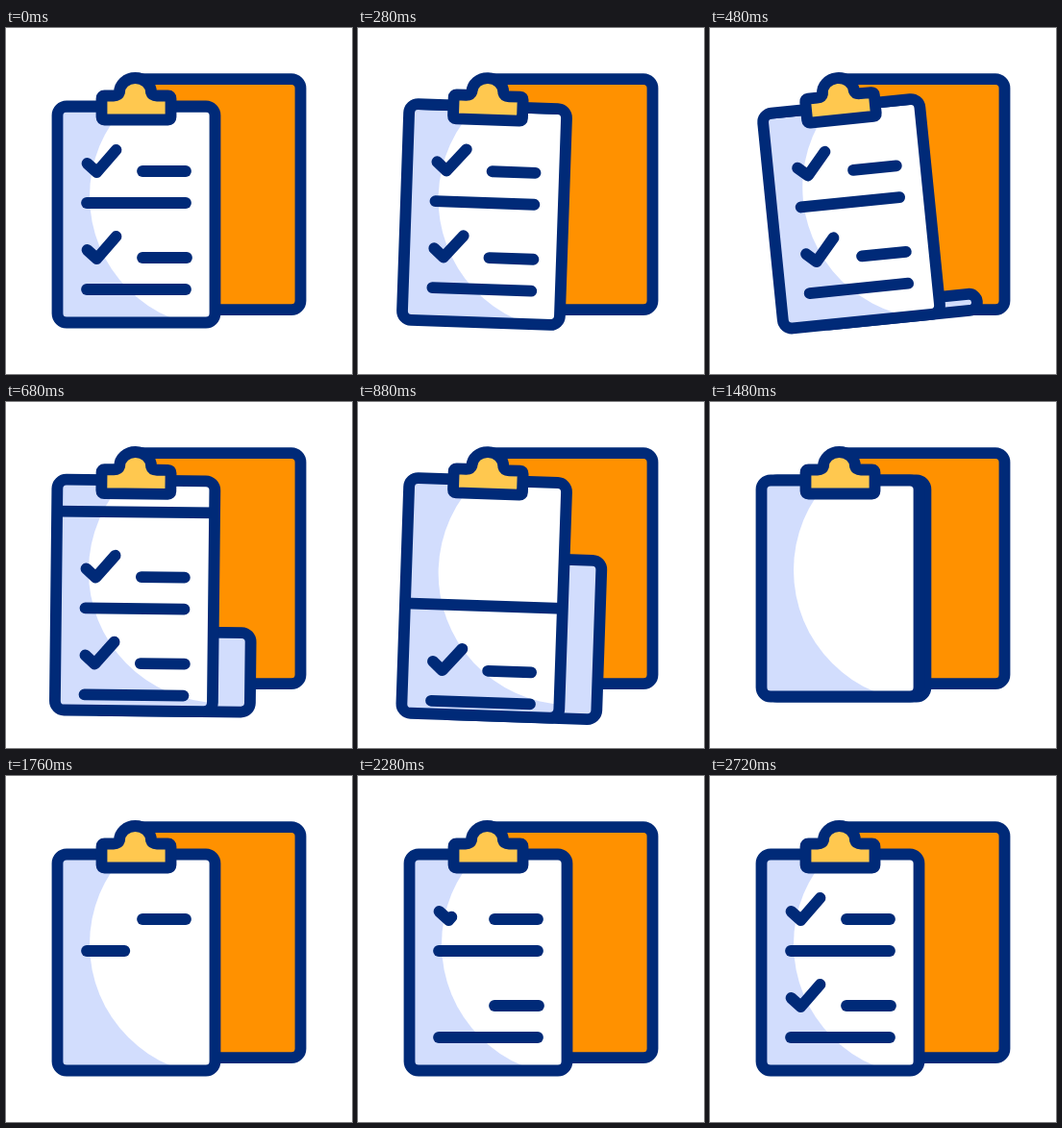
Animation of 360x360 px, one loop 3000 ms. Source, as an HTML page with a canvas:

```html
<!DOCTYPE html>
<html lang="en">
<head>
<meta charset="utf-8">
<style>
  html, body { margin: 0; height: 100%; overflow: hidden; background: #fff; }
  canvas { display: block; width: 360px; height: 360px; }
</style>
</head>
<body>
<canvas id="stage"></canvas>
<script>
const LOOP = 3000;
const NAVY = '#002a78', ORANGE = '#ff9100', YELLOW = '#ffc84f', LAVENDER = '#d2ddfd';
const LEFT = 53.5, TOP = 81.5, WIDTH = 164, HEIGHT = 225, RADIUS = 9.5;
const PIVOT = [134, 78];

const canvas = document.getElementById('stage');
const ctx = canvas.getContext('2d');
const ratio = window.devicePixelRatio || 1;
canvas.width = canvas.height = 360 * ratio;

const clipShape = new Path2D(
  'M102.5 70.5H112Q117 70.5 118 67A16.5 15 0 0 1 151 67Q152 70.5 157 70.5H168.5' +
  'q3 0 3 3V92.5q0 3 -3 3H102.5q-3 0 -3 -3V73.5q0 -3 3 -3Z');

// Polylines with the times at which each is drawn.
const marks = [
  { points: [[142, 149], [187, 149]], from: 1560, to: 1700 },
  { points: [[84, 182], [187, 182]], from: 1700, to: 1860 },
  { points: [[142, 239], [188, 239]], from: 1860, to: 2000 },
  { points: [[84, 272], [187, 272]], from: 2000, to: 2180 },
  { points: [[84.5, 141], [94.5, 150], [114.5, 127]], from: 2200, to: 2400 },
  { points: [[84.5, 231], [94.5, 240], [114.5, 217]], from: 2440, to: 2680 },
];

// Swing of the clipboard: time, degrees.
const swing = [[0, 0], [200, 4.2], [465, -5.8], [780, 2.6], [1090, 0]];

const progress = (t, from, to) => Math.min(1, Math.max(0, (t - from) / (to - from)));
const smooth = u => u * u * (3 - 2 * u);
const ease = (t, from, to) => smooth(progress(t, from, to));

function angleAt(t) {
  const i = swing.findIndex(key => key[0] > t);
  if (i < 0) return 0;
  const [t0, a0] = swing[i - 1], [t1, a1] = swing[i];
  return (a0 + (a1 - a0) * ease(t, t0, t1)) * Math.PI / 180;
}

function box(x, y, w, h, radius, fill) {
  ctx.beginPath();
  ctx.roundRect(x, y, w, h, radius);
  if (fill) {
    ctx.fillStyle = fill;
    ctx.fill();
  }
  ctx.stroke();
}

function drawMark(points, amount) {
  if (amount <= 0) return;
  let length = 0;
  ctx.beginPath();
  points.forEach((p, i) => {
    ctx.lineTo(...p);
    if (i) length += Math.hypot(p[0] - points[i - 1][0], p[1] - points[i - 1][1]);
  });
  ctx.setLineDash(amount < 1 ? [length * amount, 1000] : []);
  ctx.stroke();
  ctx.setLineDash([]);
}

function drawBoard(t, height) {
  ctx.save();
  ctx.beginPath();
  ctx.roundRect(LEFT, TOP, WIDTH, height, RADIUS);
  ctx.clip();
  ctx.fillStyle = LAVENDER;
  ctx.fillRect(0, 0, 360, 400);
  ctx.fillStyle = '#fff';
  ctx.beginPath();
  ctx.arc(224, 175, 137, 0, 7);
  ctx.fill();

  // The filled sheet slides down and out; then new marks are written.
  const leaving = t < 1220;
  if (leaving) {
    ctx.translate(0, ease(t, 520, 1211) * height);
    drawMark([[LEFT, TOP], [LEFT + WIDTH, TOP]], 1);
  }
  for (const m of marks) drawMark(m.points, leaving ? 1 : progress(t, m.from, m.to));
  ctx.restore();
  box(LEFT, TOP, WIDTH, height, RADIUS);
}

function draw(t) {
  ctx.setTransform(ratio, 0, 0, ratio, 0, 0);
  ctx.fillStyle = '#fff';
  ctx.fillRect(0, 0, 360, 360);
  ctx.strokeStyle = NAVY;
  ctx.lineWidth = 11.8;
  ctx.lineCap = ctx.lineJoin = 'round';

  box(119, 53.2, 187.5, 240, [16, RADIUS, RADIUS, RADIUS], ORANGE);

  ctx.translate(...PIVOT);
  ctx.rotate(angleAt(t));
  ctx.translate(-PIVOT[0], -PIVOT[1]);

  const height = HEIGHT + 20 * Math.sin(Math.PI * progress(t, 490, 1210));
  const shift = 39 * (ease(t, 320, 420) - ease(t, 1320, 1540));
  const rise = height * ease(t, 330, 1220);
  if (shift > 0) box(LEFT + shift, TOP + height - rise, WIDTH, rise, Math.min(RADIUS, rise / 2), LAVENDER);

  drawBoard(t, height);

  ctx.fillStyle = YELLOW;
  ctx.fill(clipShape);
  ctx.stroke(clipShape);
}

function frame() {
  draw(performance.now() % LOOP);
  requestAnimationFrame(frame);
}
frame();
</script>
</body>
</html>
```
